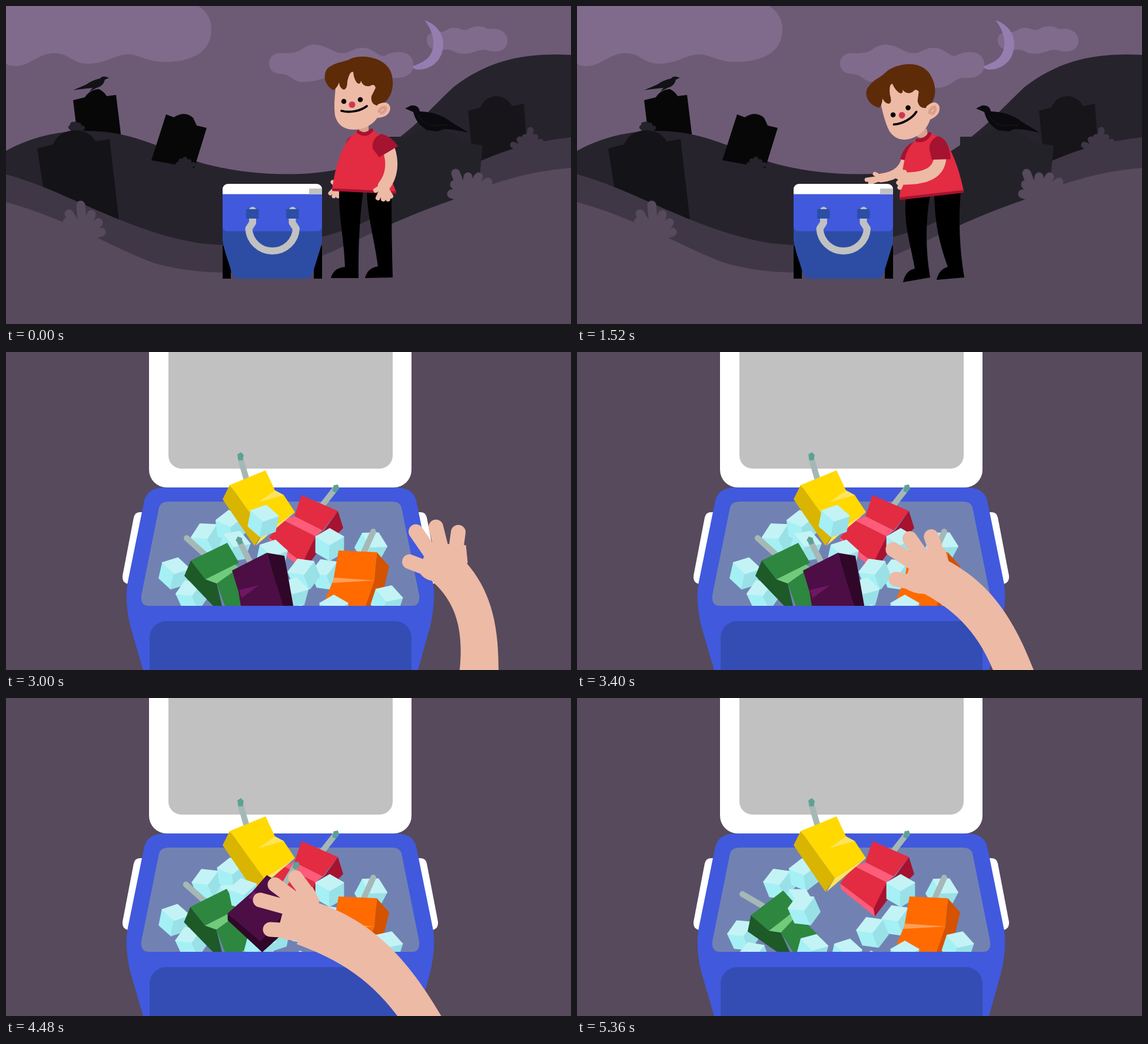
An HTML page with a canvas that plays this animation: 960x540 px, repeating every 5520 ms.

```html
<!DOCTYPE html>
<html lang="en">
<head>
<meta charset="utf-8">
<title>Ice pops in the graveyard</title>
<style>
html, body { margin: 0; width: 100%; height: 100%; overflow: hidden; background: #564a5c; }
canvas { display: block; }
</style>
</head>
<body>
<canvas width="960" height="540"></canvas>
<script>
const ctx = document.querySelector('canvas').getContext('2d');
const LOOP = 5520, CUT = 2520;
const SKIN = '#edbaa6', RED = '#e32b42', MAROON = '#a51330', GROUND = '#564a5c',
      MID = '#403746', HILL = '#27232d', CLOUD = '#806b8c', BLUE = '#4159dc', GREY = '#c1c1c1';
ctx.lineCap = ctx.lineJoin = 'round';

// Drawing helpers
function fill(color, path) {
  ctx.fillStyle = color;
  ctx.fill(new Path2D(path));
}
function line(color, width, path) {
  ctx.strokeStyle = color;
  ctx.lineWidth = width;
  ctx.stroke(new Path2D(path));
}
function box(color, x, y, w, h, radius = 0) {
  ctx.fillStyle = color;
  ctx.beginPath();
  ctx.roundRect(x, y, w, h, radius);
  ctx.fill();
}
function dot(color, x, y, r) {
  ctx.fillStyle = color;
  ctx.beginPath();
  ctx.arc(x, y, r, 0, 7);
  ctx.fill();
}
function placed(pose, cx, cy, draw) {
  const [dx, dy, angle] = pose.split(' ').map(Number);
  ctx.save();
  ctx.translate(cx + dx, cy + dy);
  ctx.rotate(angle * Math.PI / 180);
  ctx.translate(-cx, -cy);
  draw();
  ctx.restore();
}

// Poses are strings of equal structure; the numbers in them are interpolated
const NUM = /-?\d+(\.\d+)?/g;
const ease = p => (1 - Math.cos(Math.PI * Math.min(1, Math.max(0, p)))) / 2;
function mix(a, b, p) {
  const target = b.match(NUM);
  let i = 0;
  return a.replace(NUM, v => (+v + (target[i++] - v) * p).toFixed(2));
}
function shift(path, dx, dy) {
  let i = 0;
  return path.replace(NUM, v => +v + (i++ % 2 ? dy : dx));
}
function track(t, times, poses) {
  let i = 0;
  while (i < times.length - 2 && t >= times[i + 1]) i++;
  return mix(poses[i], poses[i + 1], ease((t - times[i]) / (times[i + 1] - times[i])));
}

// Graveyard
const tuft = (color, width, x, y, tips) =>
  line(color, width, tips.split(' ').map(tip => `M${x},${y}L${tip}`).join(''));

function graveyard() {
  box('#6d5b76', 0, 0, 960, 540);
  fill(CLOUD, 'M0,0L327,0Q349,15 349,40C349,75 320,95 270,95C240,95 225,82 208,82C185,82 170,98 140,98C112,98 108,80 82,80C55,80 40,103 15,102Q5,102 0,98Z');
  fill(CLOUD, 'M715,57C715,46 726,44 738,44C748,44 750,37 761,37C772,37 774,43 784,40C796,33 808,33 818,39C838,36 852,44 852,59C852,76 834,80 820,76C804,70 796,82 776,81C758,80 760,71 740,75C724,76 715,70 715,57Z');
  fill('#957daf', 'M711,24C731,31 743,46 743,65C743,92 722,109 699,108L684,104Q704,99 715,90C732,75 729,46 711,24Z');
  fill(CLOUD, 'M465,80C480,81 492,80 502,74C512,66 520,65 528,66C548,68 555,80 572,80C585,80 590,71 606,71C624,71 630,85 643,85C655,76 692,72 692,100C692,122 668,123 655,122C640,124 635,137 615,139C595,141 580,120 560,120C540,120 530,129 505,129C485,129 485,115 465,115C441,115 441,80 465,80Z');

  fill('#070708', 'M114,160L134,155Q142,142 158,141Q167,146 171,153L187,151 196,225 122,225Z');
  fill(HILL, 'M0,246C60,213 130,205 195,218C260,232 300,260 350,271C440,292 540,290 600,267C680,225 710,185 760,138C820,92 880,79 960,83L960,540 0,540Z');
  tuft(HILL, 8, 120, 214, '110,206 113,201 118,200 124,202 130,207');
  fill('#070708', 'M272,184L285,189Q304,177 318,190L324,203 341,207 320,275 247,262Z');
  tuft(HILL, 8, 304, 276, '292,269 297,263 304,260 311,264 318,269');
  fill('#141317', 'M53,242L80,235Q90,212 117,211Q143,212 152,230L176,226 195,390 70,350Z');
  fill('#17151a', 'M785,178L806,172Q814,154 833,153Q851,154 860,170L880,166 886,250 796,290Z');
  fill(MID, 'M0,286C100,312 200,382 330,403C450,415 540,400 620,362C720,300 800,262 860,243Q910,228 960,223L960,540 0,540Z');
  tuft(MID, 11, 886, 247, '862,236 873,227 882,223 891,211 899,223 908,231');
  fill('#232229', 'M651,222L682,222Q710,204 738,206Q758,213 772,231L810,237 800,340 650,400Z');
  fill(GROUND, 'M0,333C100,360 180,410 250,436C330,460 450,460 540,423C600,398 660,363 757,330C820,303 880,281 960,275L960,540 0,540Z');
  tuft(GROUND, 15, 132, 394, '104,367 107,353 127,338 145,354 157,368 162,384');
  tuft(GROUND, 15, 780, 326, '757,319 762,303 764,284 785,290 803,290 819,299');

  fill('#131217', 'M175,122L169,120Q163,119 160,123Q146,126 137,133L114,143 129,141 147,139 142,145 154,139Q166,136 168,125Z');
  fill('#0b0a0e', 'M678,174L688,169Q701,167 703,179Q735,180 755,196L786,215 760,210 744,209 733,213 716,211Q697,201 692,180Z');
  line('#1c1a20', 1, 'M700,186Q708,199 722,203L750,202');
}

// Boy beside the cooler
const LEAN = [1000, 1520], REACH = [1000, 1540, 1680, 1960, 2480];

function backArm(t) {
  const pose = poses => track(t, REACH, poses);
  line(SKIN, 15, pose([
    'M592,235C588,265 578,288 563,304', 'M560,255C556,275 545,289 516,292',
    'M560,255C556,277 540,294 510,297', 'M560,255C556,277 540,294 510,297',
    'M560,255C548,272 525,276 506,262']));
  line(SKIN, 7, pose([
    'M561,305L555,299M561,308L551,318M562,310L557,323M563,310L564,323',
    'M516,290L506,285M514,292L492,295M512,295L498,300M516,293L545,282',
    'M510,294L498,291M508,296L481,298M506,299L489,304M510,297L538,288',
    'M510,294L498,291M508,296L481,298M506,299L489,304M510,297L538,288',
    'M506,258L498,250M504,260L484,252M504,264L486,272M506,266L498,274']));
}

function cooler(t) {
  box('#000', 368, 407, 14, 56);
  box('#000', 523, 407, 14, 56);
  fill('#2d4da4', 'M368,370L368,398Q370,412 378,435L384,454Q387,463 396,463L510,463Q518,463 521,454L534,412Q537,402 537,396L537,370Z');
  box(BLUE, 368, 319, 169, 63.5, [0, 0, 8, 8]);
  ctx.lineCap = 'butt';
  line(GREY, 12, 'M419,346L419,368 412.5,378A40.3,40 0 0 0 493,378L486.5,368 486.5,346');
  ctx.lineCap = 'round';
  for (const x of [408, 476]) {
    dot(GREY, x + 11, 347, 6);
    box('#2b4ea6', x, 345, 21.5, 16);
  }
  placed(track(t, [1960, 2480], ['0 0 0', '0 0 -20.4']), 368, 319, () => {
    box('#fff', 368, 302, 169, 17.5, [9, 9, 0, 0]);
    box(GREY, 515, 310, 22, 9.5);
  });
}

function head() {
  fill(SKIN, 'M562,125Q556,165 559,186Q565,209 590,210Q616,210 631,190L640,130 635,100 580,103Z');
  fill('#5d2b08', 'M556,143C537,132 538,108 552,102C562,95 575,95 585,90C600,82 645,84 655,115C662,140 652,166 630,169Q619,166 621,153L628,139Q626,131 618,136Q607,138 603,127Q602,134 597,131Q591,125 590,112Q584,110 580,128Q580,141 574,142Q567,140 566,130Q562,140 556,143Z');
  fill(SKIN, 'M632,167Q650,159 653,173Q652,188 632,190Q624,188 626,177Z');
  line('#dc9d8b', 5, 'M634,179Q637,171 645,172Q646,179 638,182');
  dot('#000', 574, 162, 4.3);
  dot('#000', 602, 159, 4.3);
  dot('#c93a52', 588, 167.5, 5.5);
  line('#000', 3.8, 'M570,178C585,182 603,178 613,170');
}

function boy(t) {
  const lean = (a, b) => track(t, LEAN, [a, b]);
  const reach = poses => track(t, REACH, poses);
  fill('#000', lean(
    'M566,312L607,314Q598,380 599,462L552,462Q556,445 576,443C574,390 565,360 566,312Z',
    'M559,320L600,320Q588,390 600,461L554,469Q558,449 574,446C566,400 554,370 559,320Z'));
  fill('#000', lean(
    'M613,312L655,314Q655,390 657,461L610,462Q614,445 632,442C625,390 614,360 613,312Z',
    'M607,318L652,314Q646,390 658,461L611,465Q615,447 630,443C615,400 608,370 607,318Z'));
  fill(MAROON, reach([
    'M597,217Q578,222 578,234L590,236 600,222Z', 'M578,229Q556,234 549,260L565,264 580,235Z',
    'M578,229Q556,234 548,259L564,264 580,235Z', 'M578,229Q556,234 548,259L564,264 580,235Z',
    'M578,229Q556,232 545,254L560,263 580,235Z']));
  fill(RED, lean(
    'M600,211Q584,220 575,238Q560,265 554,313L663,316Q650,285 645,250Q642,220 622,210Z',
    'M579,226Q568,232 561,247Q552,270 548,326L657,314Q648,270 632,240Q622,222 598,215Z'));
  line(MAROON, 4.5, lean('M556,312L661,317', 'M550,327L655,315'));
  fill('#d9a08f', lean('M600,200L616,198 616,212Q606,219 600,212Z', 'M576,214L594,208 596,218Q586,227 578,222Z'));
  line(MAROON, 6, lean('M599,214Q612,222 621,211', 'M578,228Q592,230 599,217'));

  placed(reach(['0 0 0', '-36 18 -19', '-36 18 -19', '-36 18 -19', '-34.5 17 -19']), 588, 167.5, head);

  line(SKIN, 21, reach([
    'M650,242C658,265 656,288 642,306', 'M617,252C618,285 590,293 555,293',
    'M613,252C614,285 585,296 542,300', 'M613,252C614,285 585,296 542,300',
    'M600,255C588,272 560,275 526,264']));
  line(SKIN, 8, reach([
    'M640,306L628,313M640,309L632,326M642,310L641,328M644,310L649,328M645,308L654,323',
    'M555,291L550,279M553,291L545,290M552,294L546,300M553,296L548,308M556,291L556,282',
    'M542,298L533,290M540,300L523,299M540,302L520,306M541,304L524,313M544,304L531,316',
    'M542,298L533,290M540,300L523,299M540,302L520,306M541,304L524,313M544,304L531,316',
    'M532,258L531,238M526,258L514,241M522,262L509,255M522,267L510,266M534,260L537,247']));
  fill(MAROON, reach([
    'M638,217Q621,224 623,242L634,257 666,238Q656,222 638,217Z',
    'M612,221Q597,230 599,245L603,261 635,260Q632,224 612,221Z',
    'M612,221Q597,230 598,245L600,262 634,260Q631,224 612,221Z',
    'M612,221Q597,230 598,245L600,262 634,260Q631,224 612,221Z',
    'M610,221Q598,228 594,238L585,252 609,267 628,240Q626,222 610,221Z']));
}

// Open cooler
function stick(path, tip) {
  line('#a5b8b6', 10, path);
  if (tip) placed(tip, 0, 0, () => fill('#5fa095', 'M-5,-3L1,-7 6,-2 4,7 -3,7Z'));
}
function redPop() {
  stick('M536,262L558,234', '560 231 25');
  fill(RED, 'M502,243L564,270 538,303 490,279Z');
  fill(MAROON, 'M564,270L573,299 550,322 528,342 506,371 503,357 526,313 541,302Z');
  fill('#ff5c79', 'M470,285L490,279 538,303 526,313Z');
  fill(RED, 'M470,285L526,313 504,358 447,315Z');
  fill('#ff5c79', 'M447,315L504,358 506,371 449,325Z');
}
function yellowPop() {
  stick('M408,214L398,180', '398 177 0');
  fill('#d9b400', 'M380,226L368,250 422,329 438,306Z');
  fill('#ffd900', 'M380,226L441,201 457,235 472,243 491,272 438,306Z');
  fill('#ffe45c', 'M438,306L491,272 478,283 424,329ZM429,255L457,235 472,243Z');
}
function greenPop() {
  stick('M336,342L307,316');
  fill('#1d5a28', 'M314,354L303,380 372,452 358,393 339,386Z');
  fill('#2d873f', 'M314,354L376,324 396,358 339,386Z');
  fill('#2d873f', 'M358,393L392,369 424,417 378,448Z');
  fill('#70cb7b', 'M339,386L389,361 396,366 358,393ZM378,446L424,416 418,432 374,454Z');
}
function orangePop() {
  stick('M608,340L624,305');
  fill('#d45200', 'M630,340L651,364 643,398 632,404 618,440 608,440 626,388Z');
  fill('#ff6b00', 'M565,337L630,340 626,388 608,440 543,418 556,388Z');
  fill('#ff9f57', 'M557,383L626,388 555,392Z');
}
function purplePop() {
  stick('M415,357L398,324', '396 320 -25');
  fill('#300729', 'M443,341L473,346 491,447 414,468 404,462 472,440Z');
  fill('#4c0e45', 'M384,371L443,341 474,440 404,462 395,407Z');
  fill('#701763', 'M396,404L430,396 400,418Z');
}

function cube(settle, [x, y, turn, dx = 0, dy = 0, spin = 0]) {
  placed(`${x + dx * settle} ${y + dy * settle} ${turn + spin * settle}`, 0, 0, () => {
    const corner = i => `${27 * Math.sin(i * Math.PI / 3)},${-27 * Math.cos(i * Math.PI / 3)}`;
    const face = (color, from) => {
      const path = `M0,0L${corner(from)} ${corner(from + 1)} ${corner(from + 2)}Z`;
      fill(color, path);
      line(color, 2, path);
    };
    face('#a5f0f5', 3);
    face('#99e1e7', 1);
    face('#c4f3f6', 5);
  });
}
// x, y, turn, then the slide and spin once the purple pop is lifted
const BACK_ICE = [[342, 316, -27, 2, 0, 5], [382, 296, -8, 4, 4], [620, 331, 28], [388, 330, 20, -13, 19, 10]];
const FRONT_ICE = [[545, 378, -22], [550, 327, 0], [452, 346, 12, 6, 90], [506, 377, -22, -4, 21]];
const LEFT_ICE = [[286, 376, 13, -3, 27, -38], [316, 413, -25, -16, 28, 5]];
const TOP_ICE = [[487, 410, 15, -87, 18], [437, 287, 11, -51, 73, -35]];
const NEAR_ICE = [[647, 423, 18], [557, 440, 0], [500, 457, 0]];

function openCooler() {
  box(GROUND, 0, 0, 960, 540);
  box('#fff', 243, -40, 446, 270, 30);
  box(GREY, 276, -40, 381, 238, 22);
  fill('#fff', 'M240,272L228,272Q219,272 217,281L198,380Q197,394 211,394L240,394Z');
  fill('#fff', 'M692,272L704,272Q713,272 715,281L734,380Q735,394 721,394L692,394Z');
  fill(BLUE, 'M235,252Q241,230 270,230L662,230Q691,230 697,252L726,395Q730,425 721,465L700,540 233,540 211,465Q202,425 206,395Z');
  fill('#7182b2', 'M260,264Q263,254 276,254L656,254Q669,254 672,264L702,413Q704,431 690,431L243,431Q228,431 230,413Z');
  box('#334db4', 244, 457, 445, 120, 28);
}

// Reaching hand: arm, palm and fingers
const REST = ['M763,590C784,488 772,430 722,387L782,357C828,410 843,475 835,590Z',
  'M700,370Q712,392 735,388L785,358L782,328L735,325L712,345Z',
  'M728,372L686,356M728,350L697,305M743,345L731,297M764,342L769,306'];
const GRAB = ['M700,610C640,490 560,450 490,424L521,352C620,385 690,450 770,610Z',
  'M450,419Q475,428 500,426L524,358L512,335L470,345L462,375Z',
  'M475,409L440,407M470,370L423,357M480,355L448,331M506,350L483,319'];
const LIFT = [[4, -6], [9, -14], [9, -14]];
const HAND_TIMES = [2520, 2980, 3740, 4440, 4560, 5350];

function hand(t) {
  const [arm, palm, fingers] = REST.map((rest, i) => {
    const lifted = shift(GRAB[i], ...LIFT[i]);
    return track(t, HAND_TIMES,
      [shift(rest, 10, 275), rest, GRAB[i], lifted, lifted, shift(lifted, 70, 262)]);
  });
  fill(SKIN, arm);
  fill(SKIN, palm);
  line(SKIN, 25, fingers);
}

function pops(t) {
  const settle = ease((t - 4140) / 580), lateSettle = ease((t - 4400) / 600);
  const ice = (list, p = settle) => list.forEach(c => cube(p, c));
  const purple = () => placed(track(t, [3800, 4440, 4560, 5350],
    ['0 0 0', '19 -36 58', '19 -36 58', '89 226 58']), 435, 390, purplePop);
  const lifted = t > 4300;

  ctx.save();
  ctx.beginPath();
  ctx.rect(0, 0, 960, 431);
  ctx.clip();
  ice(BACK_ICE);
  redPop();
  yellowPop();
  ice(FRONT_ICE);
  ice(LEFT_ICE, lateSettle);
  placed(mix('0 0 0', '-13 7 -11.5', lateSettle), 350, 385, greenPop);
  orangePop();
  ice(TOP_ICE);
  if (!lifted) purple();
  ice(NEAR_ICE);
  ctx.restore();
  if (lifted) purple();
}

function frame() {
  const t = performance.now() % LOOP;
  if (t < CUT) {
    graveyard();
    backArm(t);
    cooler(t);
    boy(t);
  } else {
    openCooler();
    pops(t);
    hand(t);
  }
  requestAnimationFrame(frame);
}
frame();
</script>
</body>
</html>
```
